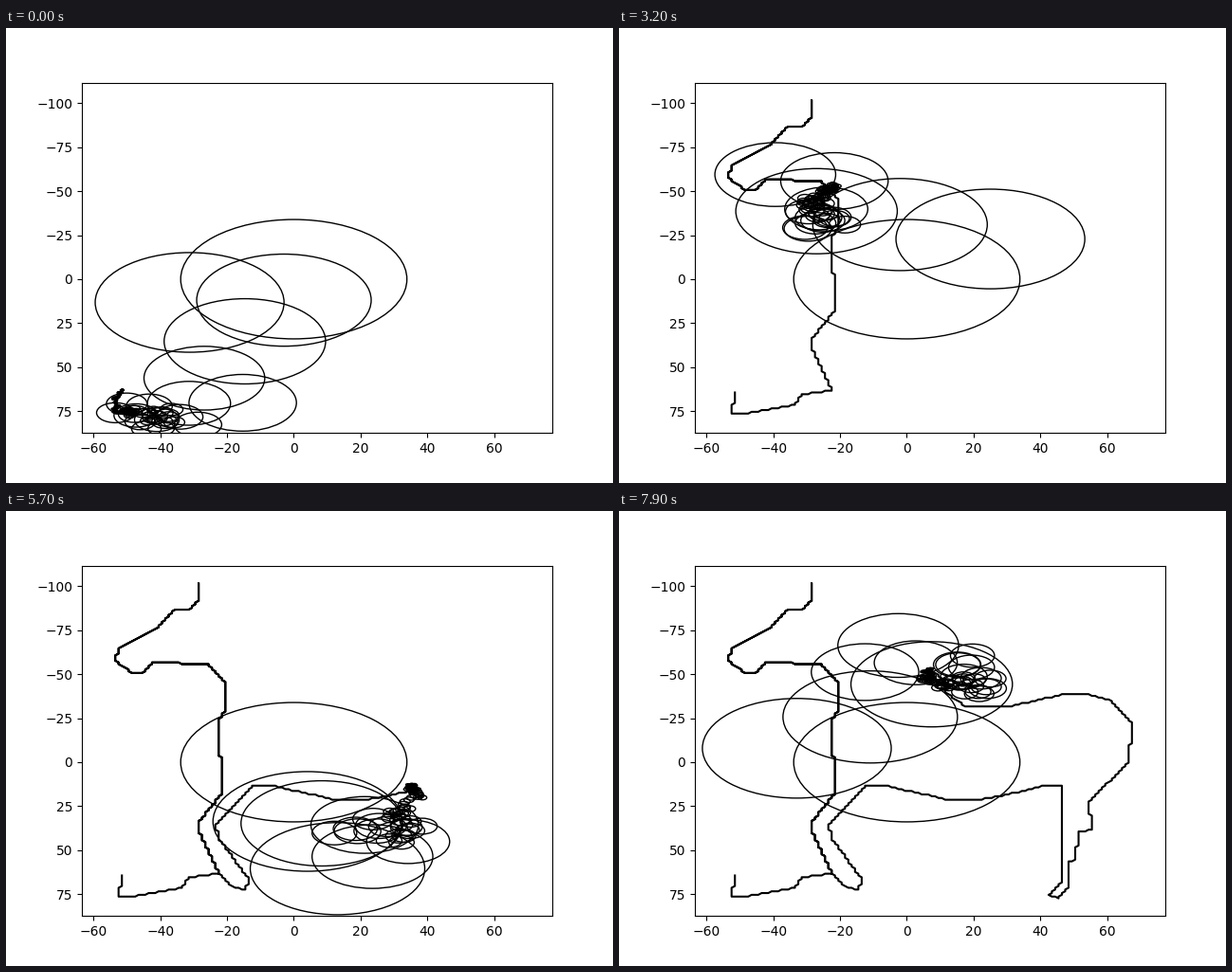
Write a matplotlib script that moves like this. It is 640 px wide and 480 px high and loops after 8 s.

```python
import numpy as np
import matplotlib.pyplot as plt
from matplotlib.animation import FuncAnimation
from matplotlib.collections import EllipseCollection

FRAMES = 80
RATE = 4      # samples per frame
TURN = 574    # samples in one full turn of the slowest circle
MARGIN = 10
CENTER = 0.48 + 0.34j  # pixel grid relative to the centre of the drawing

# Key corners of each part of the outline
START = (-52, 64)
FOOT = [(-53, 76), (-49, 76), (-34, 71), (-32, 65), (-23, 63)]
HEAD = [(-29, 38), (-29, 34), (-22, 17), (-23, -24), (-21, -30), (-21, -45),
        (-26, -56), (-43, -57), (-46, -51), (-49, -51), (-54, -58),
        (-53, -65), (-42, -76), (-36, -87), (-32, -87), (-29, -93),
        (-29, -102)]
BELLY = [(-19, 70), (-15, 72), (-14, 66), (-23, 43), (-24, 35), (-13, 13),
         (-7, 13), (12, 21), (21, 21), (35, 16)]
HIND = [(40, 13), (46, 13), (46, 68), (42, 75), (45, 77), (48, 70), (48, 56),
        (50, 55), (51, 39), (55, 38), (54, 22), (66, 0), (67, -22), (60, -36),
        (53, -39), (47, -39), (30, -32), (17, -32), (11, -40), (11, -47),
        (6, -53)]
MANE = [(-26, -100), (-26, -102)]

# Leading epicycles: frequency, radius, phase in degrees
LEADING = [(2, 33.9, 157.1), (-2, 28.3, -2.6), (1, 26.15, 116.6),
           (-3, 24.2, 120.1), (4, 18.1, 50.6), (-1, 16.1, 179),
           (-4, 12.45, 77.5), (-8, 7.1, 219), (-5, 7.0, 166.5),
           (6, 6.7, 201), (8, 6.6, -53)]


def trace(start, corners):
    """Walk the pixels between corners and keep those where the walk bends."""
    pixels = [complex(*start)]
    for a, b in zip([start] + corners, corners):
        a, b = np.array(a), np.array(b)
        n = abs(b - a).max()
        for i in range(1, n + 1):
            pixels.append(complex(*np.floor(a + (b - a) * i / n + 0.5)))
    pixels = np.array(pixels)
    step = np.diff(pixels)
    bends = np.append(step[1:] != step[:-1], True)
    return pixels[1:][bends]


def branch(start, *parts):
    """Join (corners, frames) parts; give the points and the time of each."""
    points, gaps = [], []
    for corners, frames in parts:
        line = trace(start, corners)
        points.append(line)
        gaps.append(np.full(len(line), frames / len(line)))
        start = corners[-1]
    return np.concatenate(points), np.concatenate(gaps)


def back(points, origin):
    return np.append(points[-2::-1], origin)


def reached(time):
    return np.searchsorted(times, time + 1e-6, side='right') - 1


def wave(freq, amp, n):
    return amp * np.exp(2j * np.pi * freq * n / TURN)


# The contour runs out along each branch and back along its other side
foot, foot_gaps = branch(START, (FOOT, 4.75))
head, head_gaps = branch(FOOT[-1], (HEAD, 17.75))
body, body_gaps = branch(FOOT[-1], (BELLY, 16.75), (HIND, 22), (MANE, 10.5))
first, fork = complex(*START), foot[-1]
path = CENTER + np.concatenate([
    [first], foot, head, back(head, fork), body, back(body, fork),
    back(foot, first)])
times = np.cumsum(np.concatenate([
    [0], foot_gaps, head_gaps, head_gaps[::-1], body_gaps, body_gaps[::-1],
    foot_gaps[::-1]]))

# Smaller epicycles come from the spectrum of what the leading ones leave
index = np.arange(TURN)
freqs = np.array([f for f, _, _ in LEADING])
amps = np.array([r * np.exp(1j * np.radians(a)) for _, r, a in LEADING])
tips = path[reached(index / RATE)]
rest = tips - sum(wave(f, a, index) for f, a in zip(freqs, amps))
spectrum = np.fft.fft(rest) / TURN
order = np.argsort(-np.abs(spectrum))
freqs = np.append(freqs, np.fft.fftfreq(TURN, 1 / TURN)[order])
amps = np.append(amps, spectrum[order])

fig, ax = plt.subplots(figsize=(6.4, 4.8), dpi=100)
ax.set_xlim(path.real.min() - MARGIN, path.real.max() + MARGIN)
ax.set_ylim(path.imag.max() + MARGIN, path.imag.min() - MARGIN)

size = 2 * np.abs(amps)
circles = EllipseCollection(size, size, np.zeros(len(size)), units='xy',
                            offsets=np.zeros((len(size), 2)),
                            offset_transform=ax.transData,
                            facecolors='none', edgecolors='black',
                            linewidths=1)
ax.add_collection(circles, autolim=False)
trail, = ax.plot([], [], color='black', lw=1.5)


def update(frame):
    ends = np.cumsum(wave(freqs, amps, frame * RATE))
    centers = np.append(0, ends[:-1])
    circles.set_offsets(np.column_stack([centers.real, centers.imag]))
    done = path[:reached(frame) + 1]
    trail.set_data(done.real, done.imag)
    return circles, trail


anim = FuncAnimation(fig, update, frames=FRAMES, interval=100, repeat=True,
                     repeat_delay=0, blit=False)
plt.show()
```
